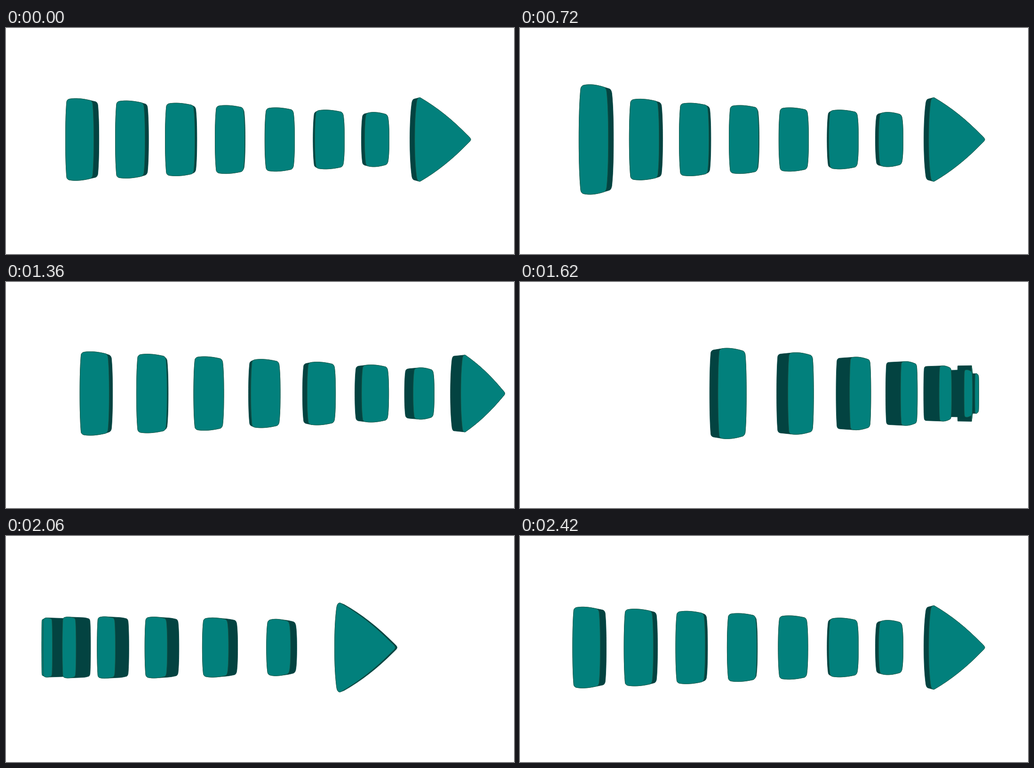
An HTML page with a canvas for the animation above (2.44 s loop, 1080x482 px).

```html
<!DOCTYPE html>
<html lang="en">
<head>
<meta charset="utf-8">
<title>Segmented arrow</title>
<style>
  html, body { margin: 0; width: 100%; height: 100%; overflow: hidden; background: #fff; }
  canvas { display: block; width: 1080px; height: 482px; }
</style>
</head>
<body>
<canvas id="stage" width="1080" height="482"></canvas>
<script>
const ctx = document.getElementById('stage').getContext('2d');
const LOOP = 2440, FRAME = 20;
const TURN_START = 742, TURN_LENGTH = 1630, TURN_LAG = 23;
const CENTER_X = 540, CENTER_Y = 237.8;
const CAMERA = 1290;    // camera to the resting front plane
const PIVOT = 540;      // front plane to the rotation axis
const THICKNESS = 42;
const TEAL = '#02807c', DARK = '#034341', RIM = '#1c5a46';

const clamp01 = v => Math.min(1, Math.max(0, v));

// Cubic Bezier easing: a small wind-up, a fast turn, a soft stop.
function ease(x) {
  if (x <= 0 || x >= 1) return clamp01(x);
  const curve = (s, a, b) => 3 * s * (1 - s) ** 2 * a + 3 * s * s * (1 - s) * b + s ** 3;
  let low = 0, high = 1;
  for (let i = 0; i < 30; i++) {
    const mid = (low + high) / 2;
    if (curve(mid, 1, .33) < x) low = mid; else high = mid;
  }
  return curve(low, -.09, .985);
}

// Samples quadratic segments [cx, cy, x, y] and mirrors them below the axis.
function outline(start, segments) {
  const top = [start];
  let [px, py] = start;
  for (const [cx, cy, x, y] of segments) {
    for (let i = 1; i <= 8; i++) {
      const s = i / 8, r = 1 - s;
      top.push([r * r * px + 2 * r * s * cx + s * s * x, r * r * py + 2 * r * s * cy + s * s * y]);
    }
    [px, py] = [x, y];
  }
  return top.concat(top.slice(1, -1).reverse().map(([x, y]) => [x, -y]));
}

function barShape(k, time) {
  const wave = Math.sin(Math.PI * clamp01((time - 100 - 50 * (6 - k)) / 400)) ** 2;
  const stretch = .14 * (7 - k) * wave;
  const bulge = 3.5 * stretch;
  const width = k === 0 ? 60 : k === 6 ? 52 : 63;
  const l = 126.5 + 106 * k - CENTER_X, r = l + width, h = 87.5 - 4.9 * k;
  return outline([l - bulge, 0], [
    [l - bulge, -.6 * h, l + 2.5, 7 - h],
    [l + 3.5, 2 - h, l + 9, 1 - h],
    [l + width * .45, -h - 2, r - 8, 4 - h],
    [r - 4, 5 - h, r - 2.5, 11 - h],
    [r + bulge, -.6 * h, r + bulge, 0]
  ]).map(([x, y]) => [x, y * (1 + stretch)]);
}

const HEAD = outline([329, 0], [
  [329, -48, 333, -79],
  [334.5, -91, 341, -89],
  [394, -58, 441, -9],
  [448, -3, 448, 0]
]);

function project([x, y], depth, angle) {
  const sin = Math.sin(angle), cos = Math.cos(angle), reach = PIVOT - depth;
  const scale = CAMERA / (CAMERA + PIVOT - reach * cos + x * sin);
  return [CENTER_X + scale * (x * cos + reach * sin), CENTER_Y + scale * y];
}

const cross = (o, a, b) => (a[0] - o[0]) * (b[1] - o[1]) - (a[1] - o[1]) * (b[0] - o[0]);

function convexHull(points) {
  const sorted = [...points].sort((a, b) => a[0] - b[0] || a[1] - b[1]);
  const chain = list => {
    const out = [];
    for (const p of list) {
      while (out.length > 1 && cross(out.at(-2), out.at(-1), p) <= 0) out.pop();
      out.push(p);
    }
    return out.slice(0, -1);
  };
  return [...chain(sorted), ...chain(sorted.reverse())];
}

function signedArea(points) {
  return points.reduce((sum, p, i) => {
    const q = points[(i + 1) % points.length];
    return sum + p[0] * q[1] - p[1] * q[0];
  }, 0);
}

function paint(points, fill, stroke) {
  ctx.beginPath();
  points.forEach(([x, y]) => ctx.lineTo(x, y));
  ctx.closePath();
  ctx.fillStyle = fill;
  ctx.fill();
  ctx.strokeStyle = stroke;
  ctx.lineWidth = .8;
  ctx.stroke();
}

function draw(time) {
  ctx.fillStyle = '#fff';
  ctx.fillRect(0, 0, 1080, 482);
  const parts = [];
  for (let k = 0; k < 8; k++) {
    const shape = k === 7 ? HEAD : barShape(k, time);
    const angle = 2 * Math.PI * ease((time - TURN_START - (7 - k) * TURN_LAG) / TURN_LENGTH);
    const middle = k === 7 ? 375 : 158 + 106 * k - CENTER_X;
    const near = (PIVOT - THICKNESS / 2) * Math.cos(angle) - middle * Math.sin(angle);
    parts.push({ shape, angle, near });
  }
  parts.sort((a, b) => a.near - b.near);
  for (const { shape, angle } of parts) {
    const front = shape.map(p => project(p, 0, angle));
    const back = shape.map(p => project(p, THICKNESS, angle));
    paint(convexHull([...front, ...back]), DARK, DARK);
    if (signedArea(front) > 0) paint(front, TEAL, RIM);
  }
}

const startTime = performance.now();
function tick() {
  const time = (performance.now() - startTime) % LOOP;
  draw(Math.floor(time / FRAME) * FRAME);
  requestAnimationFrame(tick);
}
tick();
</script>
</body>
</html>
```
